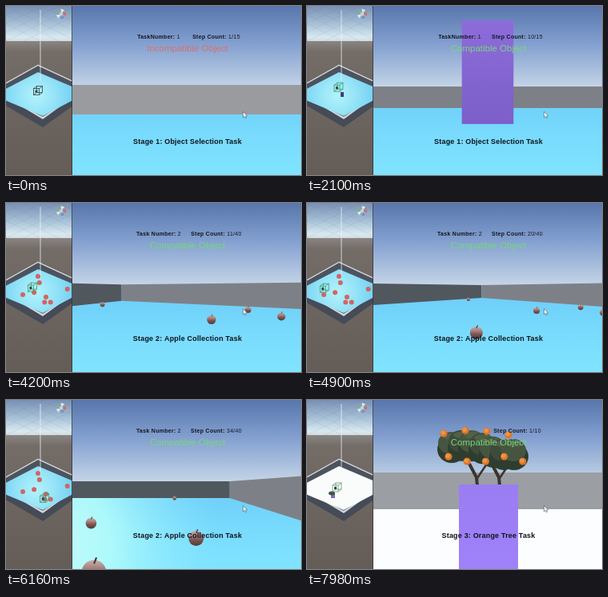
Write an HTML page with a canvas that moves like this. It is 369 px wide and 212 px high and loops after 8000 ms.

```html
<!DOCTYPE html>
<html lang="en">
<head>
<meta charset="utf-8">
<title>Room tasks</title>
<style>
  html, body { margin: 0; width: 100%; height: 100%; overflow: hidden; background: #68635f; }
  canvas { display: block; width: 100vw; height: 100vh; }
</style>
</head>
<body>
<canvas id="stage" width="369" height="212"></canvas>
<script>
const c = document.getElementById('stage').getContext('2d');
const W = 369, H = 212, SPLIT = 83, LOOP = 8000, TICK = 140;
const CX = 226, CY = 106, FOCAL = 183.6, EYE = 13, RIM = 3, SIDE = 183;
const FONT = '"Liberation Sans", Arial, sans-serif';
const TITLES = ['Object Selection', 'Apple Collection', 'Orange Tree'];
const WALL_COLORS = ['#50585e', '#7d8187', '#9a9b9e', '#52545b'];
const CORNERS = [[0, 0], [SIDE, 0], [SIDE, SIDE], [0, SIDE]];

// A curved trail, a zigzag cluster and two strays
const APPLES = [[144, 24], [65, 141]];
for (let i = 0; i < 3; i++) {
  APPLES.push([30 + 28 * i - i * i, 33 + 8.5 * i + 14.5 * i * i]);
  APPLES.push([126 + 8 * i + 22 * (i % 2), 102 + 12 * i]);
}

const span = (t, a, b) => Math.min(1, Math.max(0, (t - a) / (b - a)));

// Pose of the agent: each leg of the walk adds its share
function pose(t) {
  const side = span(t, 0, 1400), turn = span(t, 1680, 2100), back = span(t, 2380, 2800);
  const out = span(t, 3500, 4900), over = span(t, 4900, 6160), last = span(t, 6160, 6860);
  const yaw = 180 + 90 * side + 180 * turn - 45 * out - 45 * over - 20 * last;
  const rad = yaw * Math.PI / 180;
  return {
    x: 89 - 14 * side + 16.5 * back - 33.5 * out + 84 * over - 14 * last,
    y: 103.5 - 13.5 * side + 1.5 * back + 44.5 * out + 4 * over - 28 * last,
    drift: over, yaw, sin: Math.sin(rad), cos: Math.cos(rad)
  };
}

function steps(stage, t) {
  if (stage === 3) return '1/10';
  if (stage === 2) return Math.floor(Math.min(40, Math.max(1, 2 + (t - 3360) / 85.5))) + '/40';
  return Math.floor(t < 1680 ? 1 + t / 336 : Math.min(15, 6 + (t - 1680) / 105)) + '/15';
}

function trace(p) {
  c.beginPath();
  for (let i = 0; i < p.length; i += 2) c.lineTo(p[i], p[i + 1]);
}

function poly(fill, ...p) {
  trace(p);
  c.fillStyle = fill;
  c.fill();
}

function line(color, width, ...p) {
  trace(p);
  c.strokeStyle = color;
  c.lineWidth = width;
  c.stroke();
}

function oval(x, y, rx, ry, fill) {
  c.beginPath();
  c.ellipse(x, y, rx, ry, 0, 0, 7);
  c.fillStyle = fill;
  c.fill();
}

const dot = (x, y, r, fill) => oval(x, y, r, r, fill);

function rect(fill, x, y, w, h) {
  c.fillStyle = fill;
  c.fillRect(x, y, w, h);
}

function fade(g, stops) {
  stops.forEach(([at, color]) => g.addColorStop(at, color));
  return g;
}

const ramp = (y0, y1, ...stops) => fade(c.createLinearGradient(0, y0, 0, y1), stops);
const glow = (x, y, r, ...stops) => fade(c.createRadialGradient(x, y, 0, x, y, r), stops);

function panel(x, w, paint) {
  c.save();
  c.beginPath();
  c.rect(x, 0, w, H);
  c.clip();
  paint();
  c.restore();
}

function text(str, x, y, font, color, gap = 0, align = 'center') {
  c.font = font + ' ' + FONT;
  c.letterSpacing = gap + 'px';
  c.textAlign = align;
  c.fillStyle = color;
  c.fillText(str, x, y);
}

function label(name, value, x, y) {
  const ink = '#14161f', gap = 0.28;
  c.letterSpacing = gap + 'px';
  c.font = 'bold 7px ' + FONT;
  const a = c.measureText(name + ' ').width;
  c.font = '7px ' + FONT;
  const left = x - (a + c.measureText(value).width) / 2;
  text(name, left, y, 'bold 7px', ink, gap, 'left');
  text(value, left + a, y, '7px', ink, gap, 'left');
}

// World to camera: sideways offset and depth
function toCam(cam, x, y) {
  const dx = x - cam.x, dy = y - cam.y;
  return [dx * cam.cos + dy * cam.sin, dx * cam.sin - dy * cam.cos];
}

function drawWall(cam, from, to, color) {
  const p = toCam(cam, ...from), q = toCam(cam, ...to);
  if (p[1] < 1 && q[1] < 1) return;
  const clip = (a, b) => {
    if (a[1] >= 1) return a;
    const k = (1 - a[1]) / (b[1] - a[1]);
    return [a[0] + (b[0] - a[0]) * k, 1];
  };
  const [a, b] = [clip(p, q), clip(q, p)];
  const sa = FOCAL / a[1], sb = FOCAL / b[1];
  const xa = CX + a[0] * sa, xb = CX + b[0] * sb;
  poly(color, xa, CY - RIM * sa, xb, CY - RIM * sb, xb, CY + EYE * sb, xa, CY + EYE * sa);
}

function drawApple([lat, z]) {
  const s = FOCAL / z, r = 1.6 * s, x = CX + lat * s, y = CY + 11.4 * s;
  dot(x, y, r, ramp(y - r, y + r, [0, '#c9b0ac'], [0.35, '#a37f7b'], [0.6, '#7c5552'], [1, '#513836']));
  line('#4a3733', Math.max(0.6, r * 0.14), x, y - r * 0.7, x + r * 0.2, y - r * 1.2);
}

function drawBox(cam, x, bright) {
  const [lat, z] = toCam(cam, x, 90);
  if (z < 20) return;
  const s = FOCAL / z, top = CY - 27.2 * s, h = 40.2 * s;
  const fill = ramp(top, top + h, [0, bright ? '#8d6cda' : '#51448f'], [1, bright ? '#7c5fc8' : '#4b4089']);
  rect(fill, CX + (lat - 10) * s, top, 20 * s, h);
}

function drawTree() {
  for (const x of [213, 241]) {
    line('#3b342f', 4, x, 107, x - 1, 97, x - 10, 80);
    line('#3b342f', 2.5, x, 98, x + 14, 77);
  }
  // Overlapping lobes, dark below and light above
  for (let i = 0; i < 7; i++) {
    const x = 181 + 13 * i, y = 57 - 4 * Math.sin(i * 0.9) + i;
    oval(x, y + 5, 18, 17, '#2f3d2f');
    oval(x - 1, y - 3, 16, 14, i % 2 ? '#3d4c3a' : '#465540');
    oval(x, y - 11, 11, 4, '#526048');
  }
  const orange = (x, y) => {
    dot(x, y, 4.6, '#d9772c');
    dot(x - 0.8, y - 1, 2.8, '#f29343');
  };
  for (let i = 0; i < 5; i++) orange(177 + 23.2 * i, 75 - 4 * Math.cos(i * Math.PI / 1.5));
  for (let i = 0; i < 4; i++) orange(171 + 27 * i, 42 - 4 * Math.sin(i * 1.2));
}

function drawCursor() {
  const p = [296.5, 132.5, 296.5, 140, 298.3, 138.4, 299.5, 141, 300.6, 140.4, 299.5, 138, 301.6, 137.7, 296.5, 132.5];
  poly('#fff', ...p);
  line('#4a5560', 0.6, ...p);
}

function drawRoom(stage, t, cam) {
  rect(ramp(CY, H, [0, '#6ccbf7'], [0.5, '#78dafd'], [1, '#80e4ff']), SPLIT, CY, W, CY);
  // The sun's reflection lies at yaw 315
  const off = (315 - cam.yaw) * Math.PI / 180, shine = Math.cos(off);
  if (shine > 0.1) {
    c.globalAlpha = Math.min(1, shine * 1.3);
    rect(glow(CX + FOCAL * Math.tan(off), 185, 230, [0, '#d0fffa'], [0.4, '#b0fbfb'], [1, 'rgba(128,228,255,0)']),
      SPLIT, CY, W, CY);
    c.globalAlpha = 1;
  }
  CORNERS.forEach((p, i) => drawWall(cam, p, CORNERS[(i + 1) % 4], WALL_COLORS[i]));
  if (stage === 2) {
    const eye = { ...cam, x: cam.x + 12 * cam.drift, y: cam.y + 5 * cam.drift };
    APPLES.map(a => toCam(eye, ...a))
      .filter(p => p[1] > 9)
      .sort((p, q) => q[1] - p[1])
      .forEach(drawApple);
  } else if (t >= 1120 && t < 2520) {
    drawBox(cam, t < 1820 ? 18.2 : 131.8, t >= 1820);
  }
}

function drawOrchard() {
  rect('#9b9ea3', SPLIT, 91, W, 46);
  rect('#fcfdfe', SPLIT, 137, W, 75);
  drawTree();
  rect(ramp(106, H, [0, '#9a7df2'], [1, '#9f82fa']), 190, 106, 74, 106);
}

function drawView(stage, t, cam) {
  rect(ramp(0, CY, [0, '#5876ac'], [0.45, '#83a0d0'], [0.95, '#c2d3e6']), SPLIT, 0, W, H);
  if (stage === 3) drawOrchard();
  else drawRoom(stage, t, cam);
  if (stage < 3) label(stage === 1 ? 'TaskNumber:' : 'Task Number:', String(stage), 191, 41);
  label('Step Count:', steps(stage, t), 263, 41);
  if (t < 1120) text('Incompatible Object', 227, 57, '11.5px', '#d9706c');
  else text('Compatible Object', 227, 57, '11.5px', '#78d67c');
  text(`Stage ${stage}: ${TITLES[stage - 1]} Task`, 227, 172.5, 'bold 9px', '#10131d', 0.18);
  drawCursor();
}

const onMap = (x, y) => [40 + (55 * x - 50 * y) / SIDE, 82 + (28 * x + 30 * y) / SIDE];

const diamond = (fill, top, mid, bottom) => poly(fill, 40, top, 101, mid - 3, 46, bottom, -16, mid);

function drawGizmo() {
  ['#d36b66', '#6b93c9', '#e4e8ea', '#79b586', '#e4e8ea'].forEach((color, i) => {
    const a = i * Math.PI * 0.4, tip = r => [69 + r * Math.cos(a), 10 + r * Math.sin(a)];
    const [x, y] = tip(6), dx = 2.4 * Math.sin(a), dy = 2.4 * Math.cos(a);
    poly(color, ...tip(1), x + dx, y - dy, x - dx, y + dy);
  });
  dot(69, 10, 2.2, '#c9d0d4');
}

function drawAgent(x, y, color) {
  // Wire cube: two shifted squares joined at the corners
  c.strokeStyle = color;
  c.lineWidth = 0.8;
  c.strokeRect(x - 5, y - 3, 7, 8);
  c.strokeRect(x - 1, y - 6, 7, 8);
  for (const dx of [-5, 2]) for (const dy of [-3, 5]) line(color, 0.8, x + dx, y + dy, x + dx + 4, y + dy - 3);
  rect('#354047', x - 3, y - 1, 3, 3);
}

function drawMap(stage, t, cam) {
  rect(ramp(0, 46, [0, '#7890b4'], [0.5, '#a9c2d8'], [0.85, '#d8e9f0'], [1, '#cfd8da']), 0, 0, SPLIT, 46);
  rect(ramp(44, H, [0, '#8a8683'], [0.08, '#746c67'], [1, '#645c57']), 0, 44, SPLIT, H);
  for (let x = -44; x < 130; x += 22) {
    for (const dx of [100, -100]) line('rgba(100,115,135,.2)', 0.6, x, 0, x + dx, 50);
  }
  diamond('#454b57', 90, 116, 152);
  diamond('#d5dade', 73.5, 105, 142);
  diamond('#4c535e', 75, 106.5, 139);
  diamond(stage === 3 ? '#fafcfc' : glow(38, 112, 50, [0, '#b2f3fb'], [0.5, '#93e2f7'], [1, '#6fcdf1']), 83, 112, 138);
  line('rgba(240,245,245,.85)', 0.9, 43, 5, 43, 94);
  if (stage === 2) {
    for (const a of APPLES) dot(...onMap(...a), 3, '#d26464');
  }
  if (stage === 3) {
    rect('#7d69bd', 30, 117, 5, 6);
    oval(31, 117, 4, 2.5, '#3f5540');
    drawAgent(37, 110, '#659b78');
  } else {
    const [x, y] = onMap(cam.x + 12 * cam.drift, cam.y + 5 * cam.drift);
    if (t >= 1120 && t < 2520) rect('#443c78', t < 1820 ? 26 : 42, t < 1820 ? 101 : 108, 4, 6);
    drawAgent(x + 1, y - 6, t < 1120 ? '#39434a' : '#3c9c67');
  }
  drawGizmo();
}

function draw(now) {
  const t = Math.floor((now % LOOP) / TICK) * TICK;
  const stage = t < 3080 ? 1 : t < 7840 ? 2 : 3;
  const cam = pose(t);
  panel(0, SPLIT, () => drawMap(stage, t, cam));
  panel(SPLIT, W - SPLIT, () => drawView(stage, t, cam));
  rect('#33373d', SPLIT - 0.8, 0, 0.8, H);
}

const start = performance.now();
function loop() {
  draw(performance.now() - start);
  requestAnimationFrame(loop);
}
loop();
</script>
</body>
</html>
```
